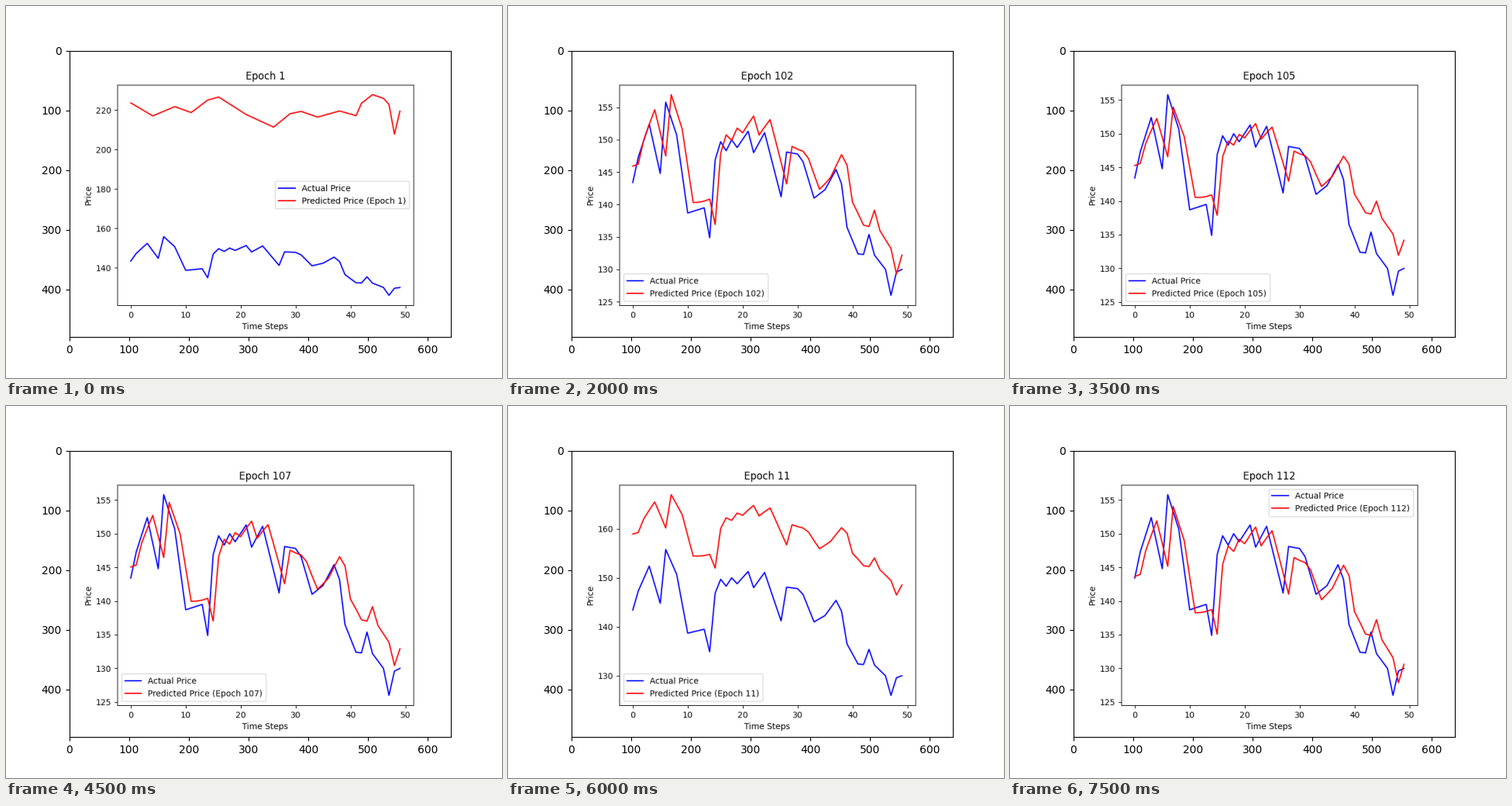
A matplotlib script for the animation above (8 s loop, 640 px wide and 480 px high).

```python
import numpy as np
import matplotlib.pyplot as plt
from matplotlib.animation import FuncAnimation

# Epochs play in text-sorted order: 1, 10, 100, 101, ...
EPOCHS = sorted([1, 10, 11, *range(100, 113)], key=str)
LEGEND_AT = {1: "center right", **dict.fromkeys((104, 110, 111, 112), "upper right")}
STEPS = np.arange(50)

# Turning points of the curves: step -> price
ACTUAL_TURNS = {
    0: 143.4, 1: 147.3, 3: 152.4, 5: 144.8, 6: 155.8, 8: 150.7, 10: 138.7,
    13: 139.5, 14: 134.9, 15: 146.9, 16: 149.7, 17: 148.3, 18: 150, 19: 148.8,
    21: 151.3, 22: 148, 24: 151.1, 27: 141.2, 28: 148.1, 30: 147.8, 31: 146.6,
    33: 141, 35: 142.3, 37: 145.4, 38: 143.2, 39: 136.5, 41: 132.4, 42: 132.3,
    43: 135.4, 44: 132.2, 46: 130, 47: 126, 48: 129.6, 49: 130,
}
UNTRAINED_TURNS = {
    0: 223.7, 4: 217.1, 8: 221.8, 11: 218.8, 14: 225.1, 16: 226.7, 21: 217.8,
    26: 211.4, 29: 218.2, 31: 219.4, 34: 216.5, 38: 219.6, 41: 217.2,
    42: 223.5, 44: 227.9, 46: 226, 47: 222.9, 48: 207.8, 49: 219.6,
}
# How the fit develops: epoch -> (level at a price of 145, gain)
FIT = {10: (165, .5), 11: (159.5, .65), 100: (148.8, .83), 103: (145.9, .92),
       105: (145.9, .7), 109: (145.7, .85), 110: (144.8, .93), 112: (144.5, .84)}


def curve(turns):
    return np.interp(STEPS, list(turns), list(turns.values()))


ACTUAL = curve(ACTUAL_TURNS)


def predicted(epoch):
    """The previous price, damped and shifted, with a slow ripple."""
    if epoch == 1:
        return curve(UNTRAINED_TURNS)
    level, gain = (np.interp(epoch, list(FIT), col) for col in zip(*FIT.values()))
    previous = np.r_[ACTUAL[0], ACTUAL[:-1]]
    ripple = 1.2 * np.cos(2 * np.pi * (STEPS - 3.5) / 19)
    return level + gain * (previous - 145) + ripple


def render_chart(epoch):
    """Draw one full-size chart and return it as an image."""
    fig.clear()
    ax = fig.add_subplot()
    ax.plot(ACTUAL, color="blue", label="Actual Price")
    ax.plot(predicted(epoch), color="red", label=f"Predicted Price (Epoch {epoch})")
    ax.set(title=f"Epoch {epoch}", xlabel="Time Steps", ylabel="Price")
    ax.legend(loc=LEGEND_AT.get(epoch, "lower left"))
    fig.canvas.draw()
    return np.array(fig.canvas.buffer_rgba())


fig = plt.figure(figsize=(6.4, 4.8), dpi=100, facecolor="white")
charts = [render_chart(epoch) for epoch in EPOCHS]

# Each chart is shown as a picture inside plain pixel axes
fig.clear()
picture = fig.add_subplot().imshow(charts[0])


def update(i):
    picture.set_data(charts[i])
    return [picture]


anim = FuncAnimation(fig, update, frames=len(charts), interval=500,
                     repeat=True, repeat_delay=0)
plt.show()
```
